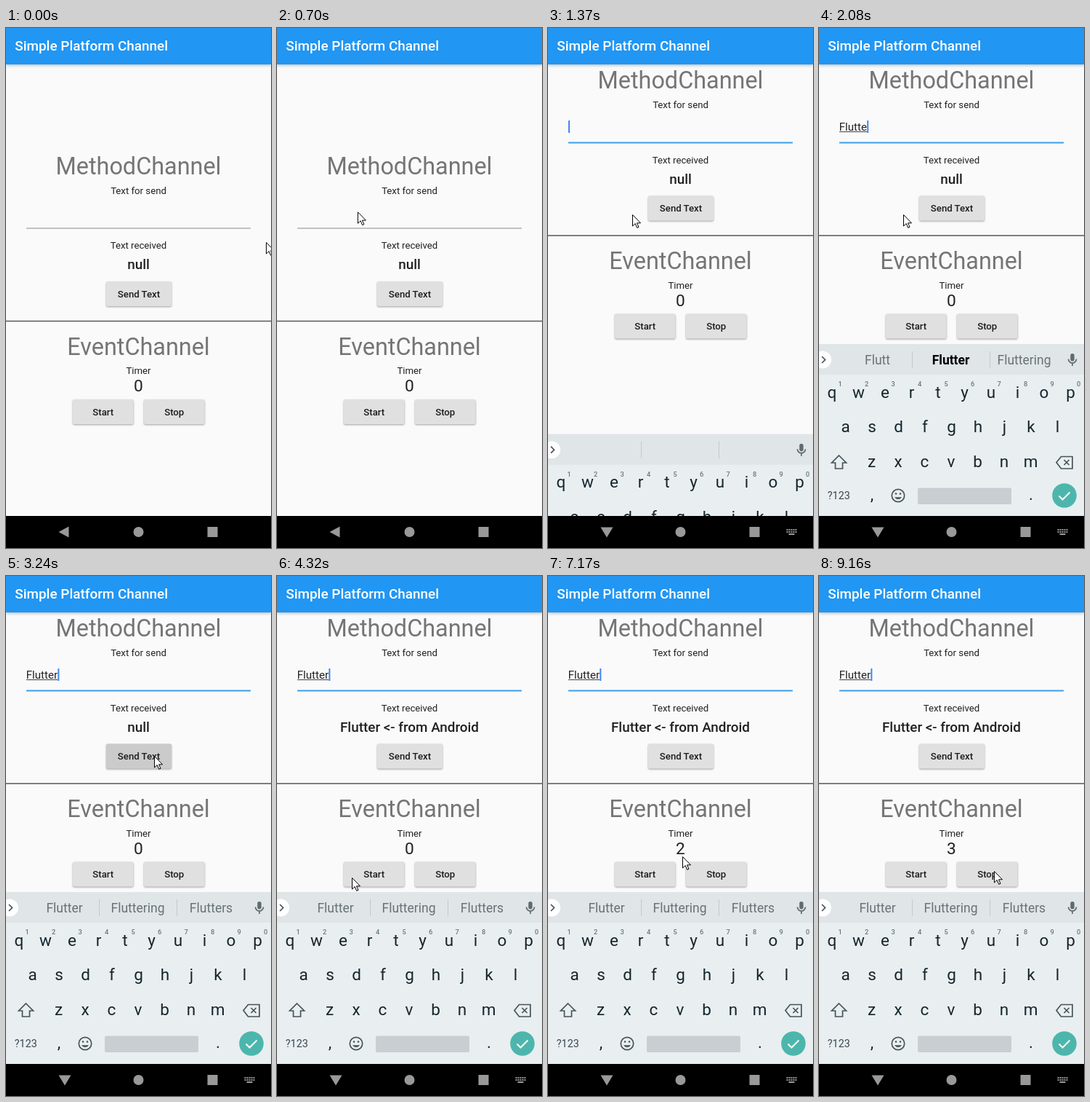
An HTML page for the animation above (9340 ms loop, 365 by 714 pixels).

```html
<!DOCTYPE html>
<html lang="en">
<head>
<meta charset="utf-8">
<title>Simple Platform Channel</title>
<style>
html, body { margin: 0; width: 100%; height: 100%; overflow: hidden; background: #fafafa; }
svg { display: block; width: 100%; height: 100%; font-family: Roboto, sans-serif; }
.mid { text-anchor: middle; }
.display { font-size: 32.4px; fill: #757575; }
.body { font-size: 13.2px; fill: #212121; }
.title { font-size: 18.9px; font-weight: 500; fill: #212121; }
.label { font-size: 13.2px; font-weight: 500; fill: #1c1c1c; }
.count { font-size: 22.7px; fill: #212121; }
.word { font-size: 17.5px; fill: #687277; }
.key { font-size: 22.5px; fill: #15262d; }
.digit { font-size: 9.3px; font-weight: 500; fill: #6d777c; }
.small { font-size: 14.3px; fill: #37474f; }
.icon { fill: none; stroke: #465459; stroke-width: 1.7; }
.face { filter: drop-shadow(0 1px 1.2px rgba(0, 0, 0, .36)); }
.bar { filter: drop-shadow(0 1px 2px rgba(0, 0, 0, .3)); }
</style>
</head>
<body>
<svg id="stage" viewBox="0 0 365 714"></svg>
<script>
const LOOP = 9340, SCROLL = 117.5, FOCUS = 1220;
const $ = id => document.getElementById(id);
const clamp = v => Math.min(1, Math.max(0, v));
const ease = v => v * v * (3 - 2 * v);
const span = (t, a, b) => clamp((t - a) / (b - a));

const text = (cls, x, y, s, id = '') =>
  `<text class="mid ${cls}" x="${x}" y="${y}" id="${id}">${s}</text>`;

const button = (id, x, y, w, s) => `
  <rect class="face" x="${x}" y="${y}" width="${w}" height="34" rx="2" fill="#e0e0e0"/>
  <rect id="${id}" x="${x}" y="${y}" width="${w}" height="34" rx="2" opacity="0"/>
  ${text('label', x + w / 2, y + 21.8, s)}`;

const row = (cls, keys, x, y) =>
  [...keys].map((k, i) => text(cls, x + i * 36.5, y, k)).join('');

const page = `
  <g id="page">
    ${text('display', 182.5, 83, 'MethodChannel')}
    ${text('body', 182.5, 110, 'Text for send')}
    <text id="input" x="27.7" y="140.5" font-size="15.1" fill="#212121"></text>
    <rect id="composing" x="28" y="142" height="1" fill="#444"/>
    <rect id="caret" y="127" width="2" height="17" fill="#4285f4"/>
    <rect id="line" x="28" width="309"/>
    ${text('body', 182.5, 185.5, 'Text received')}
    ${text('title', 182.5, 213.7, '', 'received')}
    ${button('send', 138, 230.5, 90, 'Send Text')}
    <rect y="284.2" width="365" height="1.6" fill="#616161"/>
    ${text('display', 182.5, 331, 'EventChannel')}
    ${text('body', 182.5, 357.5, 'Timer')}
    ${text('count', 182.5, 381.6, '', 'timer')}
    ${button('start', 92, 392.5, 83.5, 'Start')}
    ${button('stop', 190, 392.5, 83.5, 'Stop')}
  </g>`;

const keyboard = `
  <g id="keyboard">
    <rect y="434" width="365" height="236" fill="#e9eef1"/>
    <rect y="434" width="365" height="42" fill="#e0e5e8"/>
    <circle cx="5" cy="455.5" r="12" fill="#fff"/>
    <path d="M4 451l4.5 4.5L4 460" class="icon"/>
    <path d="M128.5 444v23M235.5 444v23" stroke="#c3c9cc"/>
    ${[80.5, 181.5, 282.5].map((x, i) => text('word', x, 462, '', 'word' + i)).join('')}
    <rect x="346.3" y="447" width="5.4" height="10.5" rx="2.7" fill="#5f6b70"/>
    <path d="M343.5 454.5a5.5 5.5 0 0 0 11 0M349 460v4" class="icon" style="stroke:#5f6b70"/>
    ${row('key', 'qwertyuiop', 18, 507.5)}
    ${row('digit', '1234567890', 29.2, 492.3)}
    ${row('key', 'asdfghjkl', 36.5, 555.3)}
    ${row('key', 'zxcvbnm', 72.5, 602.5)}
    <path class="icon" d="M27.5 587l10 10h-5v8h-10v-8h-5z"/>
    <path class="icon" d="M327 596.5l6.5-8H349v16.5h-15.500zM337.500 593l7 7m0-7l-7 7"/>
    ${text('small', 27.3, 647.3, '?123')}
    ${text('key', 73, 648, ',')}
    <circle class="icon" cx="109" cy="642" r="8.7"/>
    <path class="icon" d="M104.500 644.500a5 4 0 0 0 9 0z" style="fill:#465459;stroke-width:.6"/>
    <circle cx="106" cy="639.500" r="1.300" fill="#465459"/>
    <circle cx="112" cy="639.500" r="1.300" fill="#465459"/>
    <rect x="136" y="631.500" width="129" height="22.500" rx="2" fill="#c9ced2"/>
    ${text('key', 292, 648, '.')}
    <circle cx="338" cy="642" r="16.800" fill="#4db6ac"/>
    <path d="M330.500 642.500l5 5 10-10" fill="none" stroke="#fff" stroke-width="2"/>
  </g>`;

const dots = [0, 1, 2, 3, 4].map(i =>
  `<path d="M${328.5 + i * 3} 688h2v2h-2zm0 3h2v2h-2z"/>`).join('');

const nav = `
  <rect y="670" width="365" height="44"/>
  <g fill="#999">
    <path id="back" d="M72.500 692l14-7.500v15z"/>
    <path id="hide" d="M72.500 685.500h17l-8.500 14z"/>
    <circle cx="182.500" cy="692" r="7"/>
    <rect x="277.500" y="685" width="14" height="14"/>
    <g id="switcher">${dots}<path d="M331.500 694h8v2h-8z"/></g>
  </g>`;

$('stage').innerHTML = `
  <rect width="365" height="714" fill="#fafafa"/>
  ${page}
  <rect class="bar" width="365" height="50" fill="#2196f3"/>
  <text class="title" x="12.3" y="30.700" style="fill:#fff">Simple Platform Channel</text>
  ${keyboard}
  ${nav}
  <path id="pointer" d="M.5.5V16l3.700-3.500 2.500 5.800 2.300-1-2.500-5.500h5z" fill="#fff" stroke="#000"/>`;

// Pointer moves: start, end, control point, end point
const moves = [
  [50, 800, 54, 214, 116, 256],
  [2670, 2870, 160, 252, 204, 247],
  [3650, 4320, 315, 330, 103, 414],
  [5120, 5660, 140, 395, 185, 387],
  [6000, 6360, 185, 389, 183, 390],
  [6660, 6890, 184, 388, 185, 385],
  [8050, 8330, 214, 392, 241, 405],
];
const presses = { send: [3110, 3440], start: [4680, 4930], stop: [8520, 8750] };
const typed = [1550, 1610, 1680, 1740, 1810, 2080, 2130];
const ticks = [5860, 6860, 7860];
const passed = (list, t) => list.filter(at => t >= at).length;

function pointerAt(t) {
  let x = 358, y = 294;
  for (const [a, b, cx, cy, ex, ey] of moves) {
    if (t < a) break;
    const s = ease(span(t, a, b)), r = 1 - s;
    x = r * r * x + 2 * r * s * cx + s * s * ex;
    y = r * r * y + 2 * r * s * cy + s * s * ey;
  }
  return [x, y];
}

function wordsAt(t) {
  if (t < 1810) return ['', '', ''];
  return t < 2230 ? ['Flutt', 'Flutter', 'Fluttering'] : ['Flutter', 'Fluttering', 'Flutters'];
}

function set(id, attrs) {
  for (const k in attrs) $(id).setAttribute(k, attrs[k]);
}

function draw(t) {
  const focus = t >= FOCUS;
  set('page', { transform: `translate(0 ${focus ? 0 : SCROLL})` });
  set('line', focus ? { y: 156.5, height: 2, fill: '#3c9fe8' } : { y: 157, height: 1, fill: '#8c8c8c' });

  $('input').textContent = 'Flutter'.slice(0, passed(typed, t));
  const width = $('input').getComputedTextLength();
  set('composing', { width });
  const lit = t < 2670 || Math.floor((t - 2660) / 500) % 2 === 1;
  set('caret', { x: 28 + width, opacity: focus && lit ? 1 : 0 });

  $('received').textContent = t < 3390 ? 'null' : 'Flutter <- from Android';
  $('timer').textContent = passed(ticks, t);
  for (const id in presses) {
    const p = span(t, ...presses[id]);
    set(id, { opacity: 0.1 * Math.sin(Math.PI * p) });
  }

  set('keyboard', { transform: `translate(0 ${236 * (1 - ease(span(t, 1250, 1500)))})` });
  wordsAt(t).forEach((w, i) => {
    $('word' + i).textContent = w;
    const bold = i === 1 && t < 2230;
    $('word' + i).style.cssText = bold ? 'font-weight:700;fill:#000' : '';
  });

  const swap = focus ? span(t, 1010, 1310) : 0;
  set('back', { opacity: 1 - swap });
  set('hide', { opacity: swap });
  set('switcher', { opacity: swap });
  set('pointer', { transform: `translate(${pointerAt(t)})` });
}

const begin = performance.now();
function frame() {
  draw((performance.now() - begin) % LOOP);
  requestAnimationFrame(frame);
}
frame();
</script>
</body>
</html>
```
